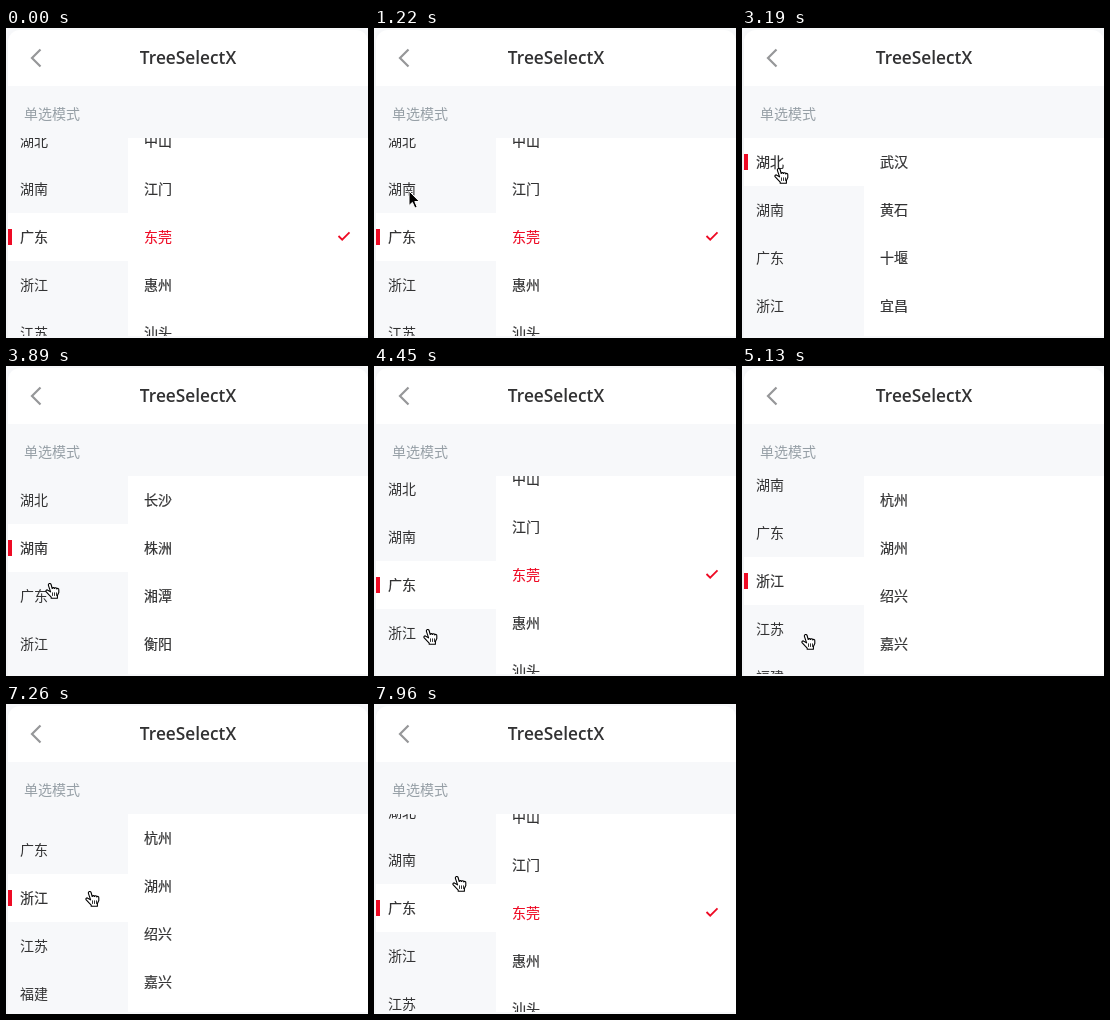
Write an HTML page that moves like this. It is 362 by 310 pixels and loops after 8000 ms.

```html
<!DOCTYPE html>
<html lang="zh">
<head>
<meta charset="utf-8">
<title>TreeSelectX</title>
<style>
  html, body { margin: 0; width: 100%; height: 100%; overflow: hidden; background: #f7f8fa; }
  svg { display: block; width: 362px; height: 310px; }
  text { font: 14px "Noto Sans CJK SC", "Noto Sans CJK", "Noto Sans", sans-serif; fill: #323233; }
  .title { font: 600 17.3px "Open Sans", sans-serif; text-anchor: middle; }
  .label { fill: #969fa6; }
  .medium { stroke: #323233; stroke-width: .2px; }
  .active { fill: #ee0a24; stroke: #ee0a24; stroke-width: .1px; }
  .page { filter: drop-shadow(0 8px 6px #ebedf0); }
</style>
</head>
<body>
<svg viewBox="0 0 362 310">
  <defs>
    <clipPath id="view"><rect x="2" y="110" width="360" height="198"/></clipPath>
  </defs>
  <rect class="page" x="2" y="2" width="360" height="340" rx="12" fill="#f7f8fa"/>
  <path d="M2 58V14A12 12 0 0 1 14 2H350A12 12 0 0 1 362 14V58Z" fill="#fff"/>
  <path d="M34.5 21.5L26 30L34.5 38.5" fill="none" stroke="#969799" stroke-width="2.2"/>
  <text class="title" x="182" y="36">TreeSelectX</text>
  <text class="label" x="18" y="91">单选模式</text>
  <g clip-path="url(#view)">
    <rect x="122" y="110" width="240" height="198" fill="#fff"/>
    <g id="nav">
      <g id="mark">
        <rect x="2" width="120" height="48" fill="#fff"/>
        <rect x="2" y="16" width="4" height="16" fill="#ee0a24"/>
      </g>
    </g>
    <g id="lists"></g>
  </g>
  <path id="arrow" d="M0 0V14.5L3.4 11.4L5.9 17.1L8.2 16.1L5.8 10.5H10.4Z" stroke="#fff"/>
  <g id="hand">
    <g transform="translate(-4 .9)" fill="#fff" stroke="#000" stroke-width="1.1" stroke-linejoin="round">
      <path d="M5.6 9L3.4 2.4a1.4 1.4 0 0 1 2.7-.8L7.2 5.6a1.2 1.2 0 0 1 2.3 0a1.2 1.2 0 0 1 2.3.4a1.1 1.1 0 0 1 2 .8V9.5L12.4 12.5V15.3H6.2V14.3L1 8.8a1.2 1.2 0 0 1 1.8-1.5Z"/>
      <path d="M7.5 9.5v3.5m2-3.5v3.5m2-3.5v3.5" stroke-width=".8"/>
    </g>
  </g>
</svg>
<script>
const NS = 'http://www.w3.org/2000/svg';
const LOOP = 8000, ROW = 48, TOP = 110, VIEW = 198;
const SCROLL_MS = 350, REST_MS = 170, HOVER = 1810, FIRST_CLICK = 2450;
const byId = id => document.getElementById(id);

const regions = [
  ['湖北', '武汉 黄石 十堰 宜昌'],
  ['湖南', '长沙 株洲 湘潭 衡阳'],
  ['广东', '中山 江门 东莞 惠州 汕头'],
  ['浙江', '杭州 湖州 绍兴 嘉兴'],
  ['江苏', '南京 无锡 苏州 常州'],
  ['福建', '厦门 福州 泉州 莆田']
];
const CHOSEN = '东莞', START = 2;

// Pointer stops: time of leaving, x, y. From FIRST_CLICK on, each stop is also a click.
const stops = [
  [90, 138, 318], [460, 99, 234], [1100, 49, 168], [1390, 35, 163], [1750, 35, 163],
  [2450, 36, 147], [3190, 36, 139], [3830, 41, 186], [4340, 46, 253], [4900, 57, 267],
  [5530, 64, 267], [6110, 74, 270], [6750, 85, 259], [7210, 84, 195], [7730, 82, 171]
];

const rowY = i => TOP + ROW * i;
const place = (el, x, y) => el.setAttribute('transform', `translate(${x} ${y})`);
const easeOut = (u, power) => 1 - (1 - Math.max(0, Math.min(1, u))) ** power;
const centred = (i, count) =>
  Math.max(0, Math.min(count * ROW - VIEW, i * ROW + ROW / 2 - VIEW / 2));

// A click selects the row that lies under the pointer at that scroll offset.
const clicks = [{ at: 0, row: START, scroll: centred(START, regions.length) }];
for (const [at, , y] of stops) {
  if (at < FIRST_CLICK) continue;
  const row = Math.floor((y - TOP + clicks[clicks.length - 1].scroll) / ROW);
  clicks.push({ at, row, scroll: centred(row, regions.length) });
}

function add(parent, tag, attrs, text) {
  const el = document.createElementNS(NS, tag);
  for (const key in attrs) el.setAttribute(key, attrs[key]);
  if (text) el.textContent = text;
  return parent.appendChild(el);
}

const names = regions.map(([name], i) => add(byId('nav'), 'text', { x: 14, y: rowY(i) + 29 }, name));

const lists = regions.map(([, line]) => {
  const group = add(byId('lists'), 'g', {});
  const cities = line.split(' ');
  const pick = cities.indexOf(CHOSEN);
  cities.forEach((city, i) => add(group, 'text',
    { x: 138, y: rowY(i) + 29, class: i === pick ? 'active' : 'medium' }, city));
  if (pick >= 0) {
    const d = `M332.5 ${rowY(pick) + 23}l3.7 3.7l7.3-7.3`;
    add(group, 'path', { d, fill: 'none', stroke: '#ee0a24', 'stroke-width': 1.8 });
    place(group, 0, -centred(pick, cities.length));
  }
  return group;
});

function pointerAt(t) {
  const k = stops.findIndex(s => s[0] > t);
  if (k < 0) return stops[stops.length - 1].slice(1);
  const [t0, x0, y0] = stops[k - 1], [t1, x1, y1] = stops[k];
  const e = easeOut((t - t0) / (t1 - REST_MS - t0), 3);
  return [x0 + (x1 - x0) * e, y0 + (y1 - y0) * e];
}

function draw(t) {
  const k = clicks.findLastIndex(c => c.at <= t);
  const now = clicks[k], from = clicks[Math.max(0, k - 1)].scroll;
  const scroll = from + (now.scroll - from) * easeOut((t - now.at) / SCROLL_MS, 2);
  place(byId('nav'), 0, -Math.floor(scroll));
  place(byId('mark'), 0, rowY(now.row));
  names.forEach((el, i) => el.setAttribute('class', i === now.row ? 'medium' : ''));
  lists.forEach((el, i) => el.style.display = i === now.row ? '' : 'none');

  const shown = t < stops[0][0] ? '' : t < HOVER ? 'arrow' : 'hand';
  for (const id of ['arrow', 'hand']) byId(id).style.display = id === shown ? '' : 'none';
  if (shown) place(byId(shown), ...pointerAt(t).map(Math.round));
}

const begin = performance.now();
function tick() {
  draw((performance.now() - begin) % LOOP);
  requestAnimationFrame(tick);
}
tick();
</script>
</body>
</html>
```
